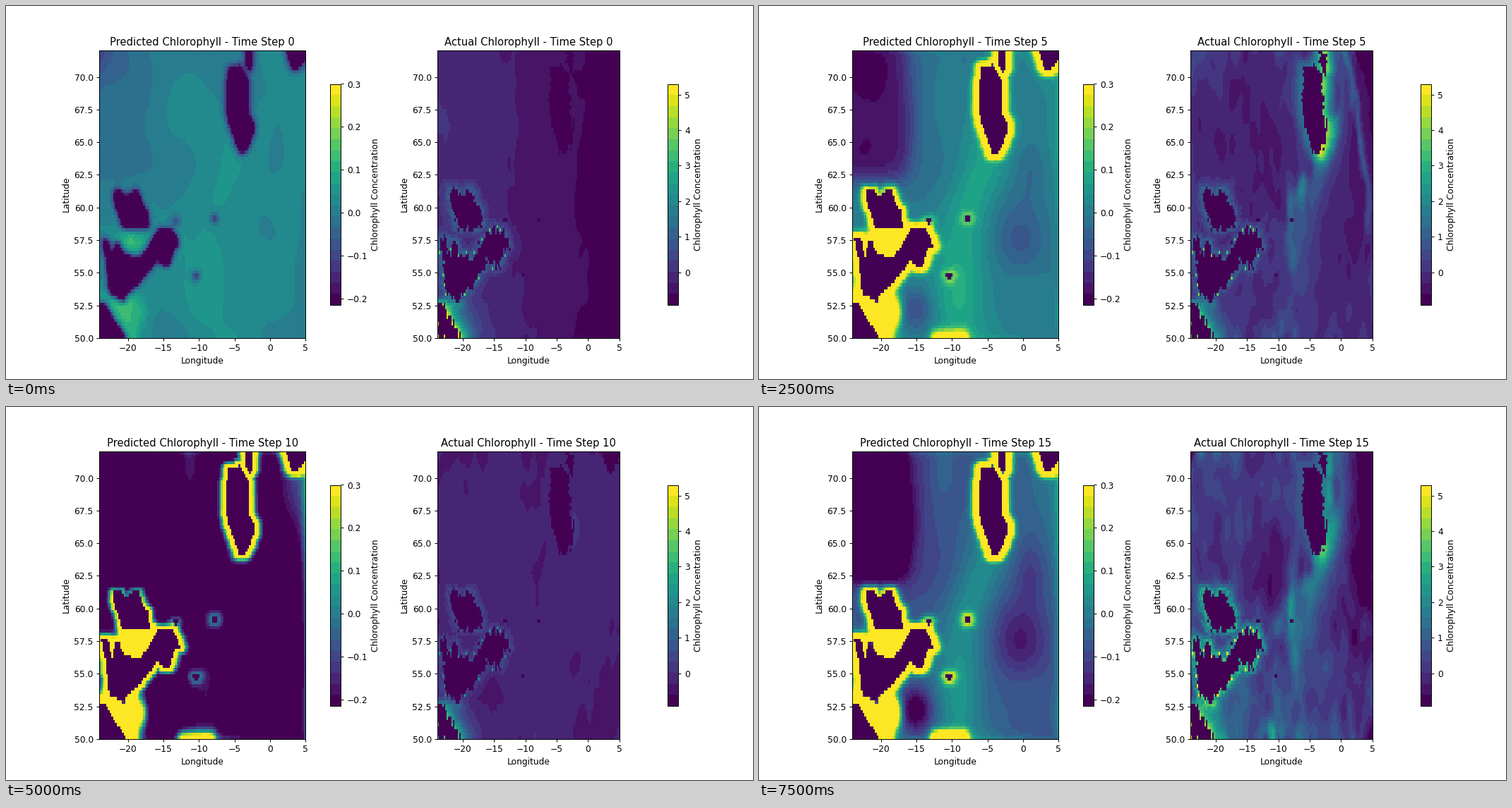
Write a matplotlib script that moves like this. It is 1058 by 529 pixels and loops after 8 s.

```python
import numpy as np
import matplotlib.pyplot as plt
from matplotlib.animation import FuncAnimation
from matplotlib.path import Path

W, H = 1058, 529
STEPS = 16
NX, NY = 117, 89
rng = np.random.default_rng(8)

lon, lat = np.meshgrid(-24 + (np.arange(NX) + .5) * 29 / NX,
                       50 + (np.arange(NY) + .5) * 22 / NY)

# coastlines as (lon, lat) points
NORTH = [(-5.9, 70.8), (-4.3, 70.9), (-3, 69.8), (-2.8, 67), (-2.2, 66.4),
         (-2.2, 65.7), (-3.5, 64.1), (-4.3, 64.1), (-5.9, 66.6), (-6.3, 68)]
ISLET = [(-3.5, 72.1), (-2.5, 72.1), (-2.3, 70.9), (-2.9, 70.3), (-3.4, 71)]
CORNER = [(2.2, 72.1), (3.1, 70.4), (3.8, 70.5), (5.1, 71.3), (5.1, 72.1)]
WEST = [(-22, 61.5), (-21, 61.4), (-20.2, 60.8), (-19.3, 61.3), (-18.4, 61.3),
        (-18, 60.4), (-17, 59.7), (-16.9, 58.4), (-20.7, 58.4), (-21.9, 60.4)]
MAIN = [(-15.8, 58.3), (-13.5, 58.3), (-12.4, 56.8), (-13.3, 56.9),
        (-14, 55.5), (-15.1, 55.5), (-15.8, 56.1), (-16.5, 55.4),
        (-18.8, 53.9), (-20.1, 53.4), (-20.3, 52.7), (-22.6, 53.4),
        (-23.1, 56), (-23.7, 57.6), (-22.7, 57.6), (-22.2, 56.1),
        (-21.6, 57.5), (-21.1, 57.4), (-20.6, 56.5), (-18.2, 56.1),
        (-17.3, 56.9)]
COAST = [(-24.1, 52.7), (-23.1, 52.6), (-21.3, 51), (-19.9, 49.9),
         (-24.1, 49.9)]
SPECKS = [(-13.2, 59), (-10.4, 54.75), (-7.8, 59.1)]


def blur(a, sy, sx):
    for axis, s in ((0, sy), (1, sx)):
        r = int(3 * s) + 1
        k = np.exp(-.5 * (np.arange(-r, r + 1) / s) ** 2)
        pad = [(0, 0), (0, 0)]
        pad[axis] = (r, r)
        a = np.apply_along_axis(np.convolve, axis, np.pad(a, pad, mode="edge"),
                                k / k.sum(), mode="valid")
    return a


def noise(sy, sx):
    n = blur(rng.normal(size=(NY, NX)), sy, sx)
    return (n - n.mean()) / n.std()


def inside(poly, jx=0., jy=0.):
    pts = np.column_stack([(lon + jx).ravel(), (lat + jy).ravel()])
    return Path(poly).contains_points(pts).reshape(NY, NX)


def specks(r):
    return np.any([np.hypot(lon - x, (lat - y) * 1.8) < r for x, y in SPECKS],
                  axis=0)


def reach(mask):
    """Distance to the masked cells, in screen pixels."""
    dx = (lon.ravel()[:, None] - lon[mask]) * 10.07
    dy = (lat.ravel()[:, None] - lat[mask]) * 18.5
    return np.sqrt((dx * dx + dy * dy).min(axis=1)).reshape(NY, NX)


def bell(a):
    return np.exp(-a ** 2)


def blob(x, y, rx, ry):
    return bell((lon - x) / rx) * bell((lat - y) / ry)


def rise(a):
    return 1 / (1 + np.exp(-np.clip(a, -40, 40)))


north = inside(NORTH) | inside(ISLET)
corner, coast = inside(CORNER), inside(COAST)
west, main = inside(WEST), inside(MAIN)
dots = specks(.45)
land = north | corner | west | main | coast | dots

jx = rng.normal(0, .15, (NY, NX))
jy = rng.normal(0, .15, (1, NX)) + np.zeros((NY, 1))
rough = specks(.28)
for poly in (NORTH, ISLET, CORNER, WEST, MAIN, COAST):
    rough |= inside(poly, jx, jy)

d_north, d_corner, d_coast = reach(north), reach(corner), reach(coast)
d_west, d_main, d_dots = reach(west), reach(main), reach(dots)

broad, broad2 = noise(7, 8), noise(7, 8)
fine, fine2 = noise(3, 1.8), noise(3, 1.8)
grain = rng.uniform(0, 1, (NY, NX))

# paths the blooms follow northwards
band = -9 + 5.5 * rise((lat - 62) / 2)
stream = -7.5 + 7 * rise((lat - 62.5) / 1.6)
stream_width = 1.4 + 2.6 * rise((60 - lat) / 3)
stream_power = .4 + .7 * bell((lat - 62) / 6)
arc = 4.3 - 3.5 * rise((lat - 67) / 2)
border = np.minimum.reduce([(5 - lon) * 10, (72 - lat) * 18.5 + 4,
                            (lat - 50) * 18.5 + 4, (lon + 24) * 10 + 6])


def predicted(step):
    grow = 1 - np.exp(-step / 4.5)
    dark = bell((step - 11) / 3.3)

    v = -.35 * dark + .009 * broad + .004 * broad2
    nw = .04 + .2 * grow
    v -= nw * rise((-16.2 - lon + .5 * broad) / .9) * rise((lat - 62.2) / .5)
    v -= .15 * nw * rise((-10 - lon + broad) / 1.8) * rise((lat - 60) / 2)
    v += (.03 + .08 * grow) * bell((lon - band) / 3.5) * rise((66 - lat) / 1.5)
    v -= .11 * grow * (blob(-.5, 57.4, 4.2, 3.2) + .5 * blob(1, 62.5, 2, 2.5))
    v -= .2 * grow ** 2 * blob(-15, 52.3, 2.2, 1.5)
    v += .02 + .18 * dark * blob(4, 69.5, 3.5, 4.2)
    v += .17 * dark * blob(-11.3, 70.8, 1.6, 2.2)
    v += (.08 * grow + .23 * dark) * np.exp(-border / 5)

    # coastal blooms
    v += .8 * grow ** 2 * rise((2.6 - abs(lon + 10.3)) / .25) * bell((lat - 50) / .65)
    wedge = .1 + grow
    v += wedge * rise((-18.6 - lon) / .35) * rise((53.3 - lat) / .25)
    v += wedge * (.55 * blob(-18, 52, .9, 1.2) + 1.1 * blob(-19.4, 57.4, 2.2, .9))
    v += 1.15 * grow * bell(np.minimum(d_north, d_corner) / 9)
    v += (.05 + grow) * bell(d_main / 9)
    v += (.05 + grow) * (.8 + .12 * fine) * bell(d_west / 8)
    v += .3 * grow ** 2 * bell(d_dots / 8)

    spread = .35 + .9 * np.exp(-2 * step)
    soft = blur(land.astype(float), spread, 1.5 * spread)
    return v * (1 - soft) - np.where(land, .4, .3) * soft


def actual(step):
    a = 2 * np.pi * step / 12
    winter = max(0, np.cos(a)) ** 4
    spring = max(0, np.sin(a)) ** 2
    summer = bell((step % 12 - 6) / 2.2)
    swirl = fine * np.cos(a) + fine2 * np.sin(a)
    drift = broad * np.cos(a) + broad2 * np.sin(a)

    v = -.25 + .42 * spring - .05 * winter
    v = v - (.028 * winter + .008 * spring) * (lon + 12.5)
    v += (.04 + .2 * spring + .05 * summer) * (.75 * swirl + .6 * drift)
    v -= .85 * spring * rise((lon - 1.6 + .4 * drift) / .45) * (.5 + .5 * rise(lat - 60))
    v -= .45 * spring * blob(-10.6, 62.5, 2.3, 4)

    # drifting blooms
    flow = .12 * (1 - winter) + 1.35 * max(spring, summer)
    v += (flow * stream_power * (1 + .16 * swirl)
          * bell((lon - stream + .5 * swirl) / stream_width))
    v += 1.4 * summer * bell((lon - arc + .2 * swirl) / .6) * rise((lat - 58.5) / .8)
    v += (.7 * spring + .3 * winter - .1) * blob(-19, 53, 5.5, 4)
    v += (.15 + .6 * spring) * blob(-10.2, 50.6, 3.5, .9) * (1 + .2 * swirl)

    # coastal blooms
    side = .35 + .65 * rise((lon + 3.8) / .4)
    v += (1.2 * spring + 4.8 * summer) * side * bell(d_north / 14)
    shore = (.8 + 2.2 * spring + .4 * winter) * (.5 + .6 * grain)
    v += shore * bell(np.minimum(d_west, d_main) / 11)
    v += 1.8 * shore * ((grain > .93) & (d_main < 6))
    v += (3.5 + 1.2 * winter) * np.exp(-d_coast / 15) * rise((52.9 - lat) / .15)
    return np.where(rough, -.92, v)


fig = plt.figure(figsize=(12, 6), dpi=W / 12, facecolor="white")
cmap = plt.get_cmap("viridis", 20)


def panel(x0, x1, bar_x, lo, hi, ticks):
    ax = fig.add_axes([x0 / W, .11, (x1 - x0) / W, .77])
    im = ax.imshow(np.zeros((NY, NX)), cmap=cmap, vmin=lo, vmax=hi,
                   origin="lower", extent=(-24, 5, 50, 72), aspect="auto",
                   interpolation="nearest")
    ax.set_xticks(np.arange(-20, 6, 5))
    ax.set_yticks(np.arange(50, 72, 2.5))
    ax.set_xlabel("Longitude")
    ax.set_ylabel("Latitude")
    cax = fig.add_axes([bar_x / W, 1 - 423.9 / H, 15.7 / W, 313.4 / H])
    fig.colorbar(im, cax=cax, ticks=ticks, label="Chlorophyll Concentration")
    return im, ax.set_title("")


left, left_title = panel(132.4, 424.3, 458.6, -.2145, .3,
                         [-.2, -.1, 0, .1, .2, .3])
right, right_title = panel(611.4, 868.6, 936.8, -.92, 5.3, range(6))


def draw(step):
    left.set_data(predicted(step))
    right.set_data(actual(step))
    left_title.set_text(f"Predicted Chlorophyll - Time Step {step}")
    right_title.set_text(f"Actual Chlorophyll - Time Step {step}")
    return left, right, left_title, right_title


anim = FuncAnimation(fig, draw, frames=STEPS, interval=500, repeat=True,
                     repeat_delay=0, blit=False)
plt.show()
```
